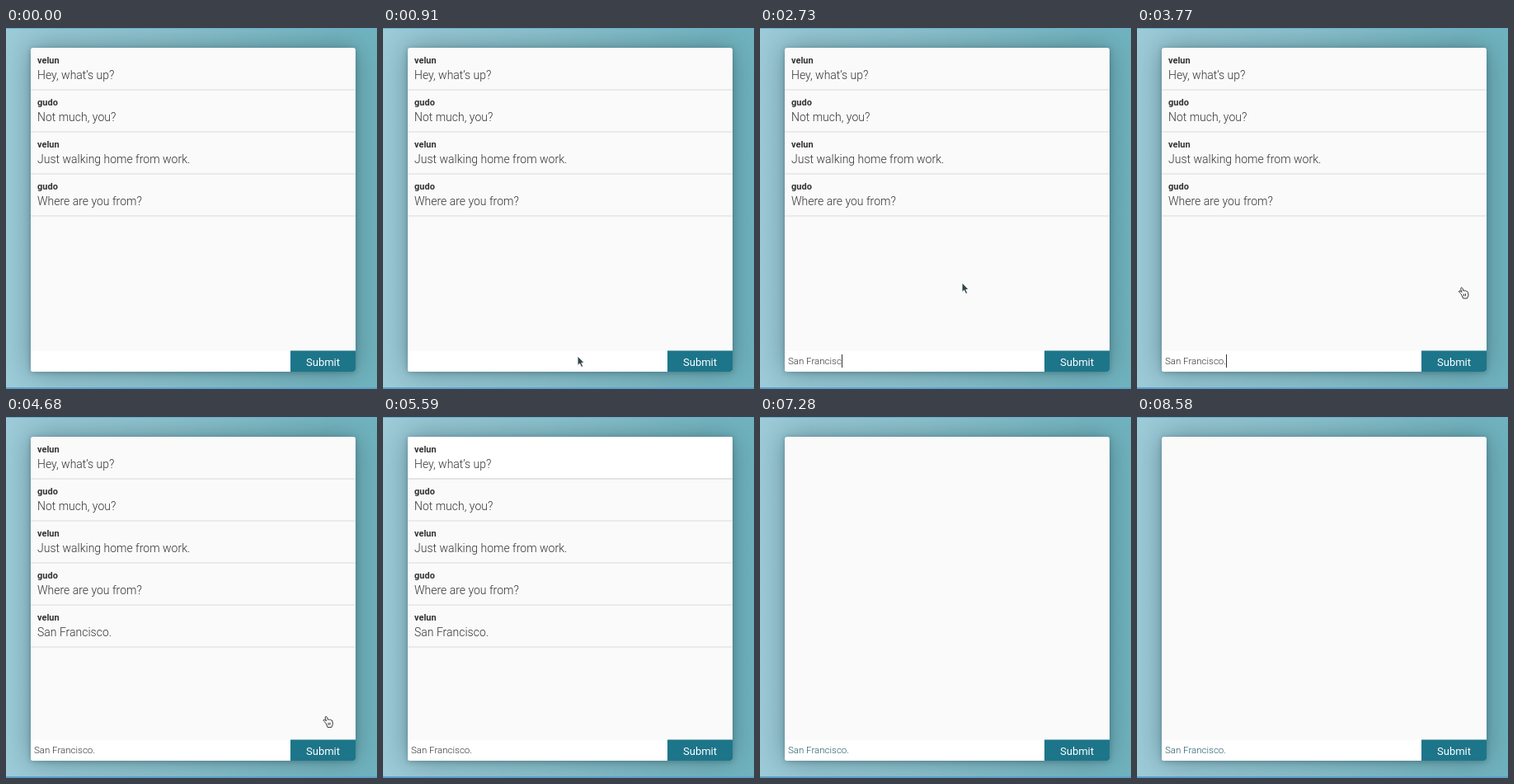
An HTML page for the animation above (8.71 s loop, 450x438 px).

```html
<!DOCTYPE html>
<html lang="en">
<head>
<meta charset="utf-8">
<title>Chat demo</title>
<style>
  html, body { margin: 0; width: 100%; height: 100%; overflow: hidden; }
  body { background: linear-gradient(90deg, #9dcbd8, #8cc3ce 45%, #6fb3be); }
  .card {
    position: absolute; left: 30px; top: 24px; width: 394px; height: 393px;
    border-radius: 3px; background: #fafafa;
    box-shadow: 0 0 34px rgba(20, 50, 60, .4), 0 1px 6px rgba(20, 50, 60, .3);
  }
  svg { position: absolute; left: 0; top: 0; }
  text { font-family: Roboto, sans-serif; white-space: pre; fill: #444; }
  .name { font-size: 11px; font-weight: 700; fill: #333; }
  .msg { font-size: 14px; font-weight: 300; fill: #333; }
  .draft { font-size: 11.5px; font-weight: 300; fill: #333; }
  .submit { font-size: 13px; fill: #fff; }
  .pointer path { stroke: #fff; stroke-width: 1; fill: #2f4448; }
  #hand path { fill: #fff; stroke: #333; }
</style>
</head>
<body>
<div class="card"></div>
<svg width="450" height="438">
  <path d="M0 .5H450" stroke="#6aaed8"/>
  <path d="M0 437H450" stroke="#5d9fca" stroke-width="2"/>
  <g id="rows"></g>
  <path d="M30 391.5H345V417H33Q30 417 30 414Z" fill="#fff"/>
  <path d="M345 391.5H424V414Q424 417 421 417H345Z" fill="#1d758a"/>
  <text class="submit" x="364" y="409.5">Submit</text>
  <text class="draft" id="draft" x="34" y="408"></text>
  <path id="caret" d="M0 396V412" stroke="#333"/>
  <g class="pointer" id="pointer">
    <path id="arrow" d="M0 0V11.5L2.6 9.2L4.6 13.5L6.8 12.5L4.8 8.4H8.2Z"/>
    <g id="hand">
      <path d="M3.5 8L1.4 6Q0 5 .8 4Q1.7 3.4 3 4.6L4 5.6L2.7 1.6Q2.5 .2 3.6 0Q4.6 0 5 1.2L6 4Q7 3.1 7.8 4Q9 3.3 9.6 4.4Q11 4.2 11.3 5.6L12 9L10.5 13H5.5Z"/>
      <path d="M6.5 7.5V10.5M8.5 7.3V10.3" />
    </g>
  </g>
</svg>
<script>
const $ = id => document.getElementById(id);
const LOOP = 8710, STEP = 130, ROW = 51, TOP = 24;
const CLICK = 1040, TYPE = 1300, SENT = 4290, HIDE = 5460;
const REPLY = 'San Francisco.';
const removals = [5720, 6110, 6500, 6890, 7150];
const messages = [
  ['velun', 'Hey, what’s up?'],
  ['gudo', 'Not much, you?'],
  ['velun', 'Just walking home from work.'],
  ['gudo', 'Where are you from?'],
  ['velun', REPLY]
];

// Pointer stops: time, x, y
const path = [
  [260, 440, 300], [780, 236, 398], [1040, 236, 398], [1300, 245, 309],
  [3120, 245, 309], [3640, 390, 315], [3770, 390, 315], [4030, 385, 400],
  [4550, 385, 400], [5200, 380, 48], [LOOP, 380, 48]
];

function pointerAt(t) {
  const i = path.findIndex(p => p[0] > t);
  if (i < 1) return path[0].slice(1);
  const [t0, x0, y0] = path[i - 1], [t1, x1, y1] = path[i];
  const k = (t - t0) / (t1 - t0), e = k * k * (3 - 2 * k);
  return [x0 + (x1 - x0) * e, y0 + (y1 - y0) * e];
}

function rowMarkup([name, msg], i, hovered) {
  const y = TOP + i * ROW;
  const fill = hovered ? `<rect x="30" y="${y}" width="394" height="${ROW}" rx="2" fill="#fff"/>` : '';
  return `${fill}<path d="M30 ${y + ROW}H424" stroke="#e4e4e4" stroke-width="${hovered ? 2 : 1.5}"/>
    <text class="name" x="38" y="${y + 19}">${name}</text>
    <text class="msg" x="38" y="${y + 37.5}">${msg}</text>`;
}

function draw(t) {
  const [x, y] = pointerAt(t);
  const gone = removals.filter(r => t >= r).length;
  const hover = t >= 260 ? Math.floor((y - TOP) / ROW) : -1;
  $('rows').innerHTML = messages.slice(gone, t < SENT ? 4 : 5)
    .map((m, i) => rowMarkup(m, i, i === hover)).join('');

  const typed = Math.max(0, Math.floor((t - TYPE) / STEP) + 1);
  const draft = $('draft');
  draft.textContent = REPLY.slice(0, typed);
  draft.style.fill = gone === 5 ? '#1f5a68' : '';
  const caretX = Math.round(34 + draft.getComputedTextLength()) + .5;
  $('caret').setAttribute('transform', `translate(${caretX})`);
  $('caret').style.display = t >= CLICK && t < SENT ? '' : 'none';

  const onHand = x > 340 && t > 3120;
  $('pointer').style.display = t >= 260 && t < HIDE ? '' : 'none';
  $('pointer').setAttribute('transform', `translate(${x} ${y})`);
  $('arrow').style.display = onHand ? 'none' : '';
  $('hand').style.display = onHand ? '' : 'none';
}

function frame() {
  const t = performance.now() % LOOP;
  draw(Math.floor(t / STEP) * STEP);
  requestAnimationFrame(frame);
}
frame();
</script>
</body>
</html>
```
